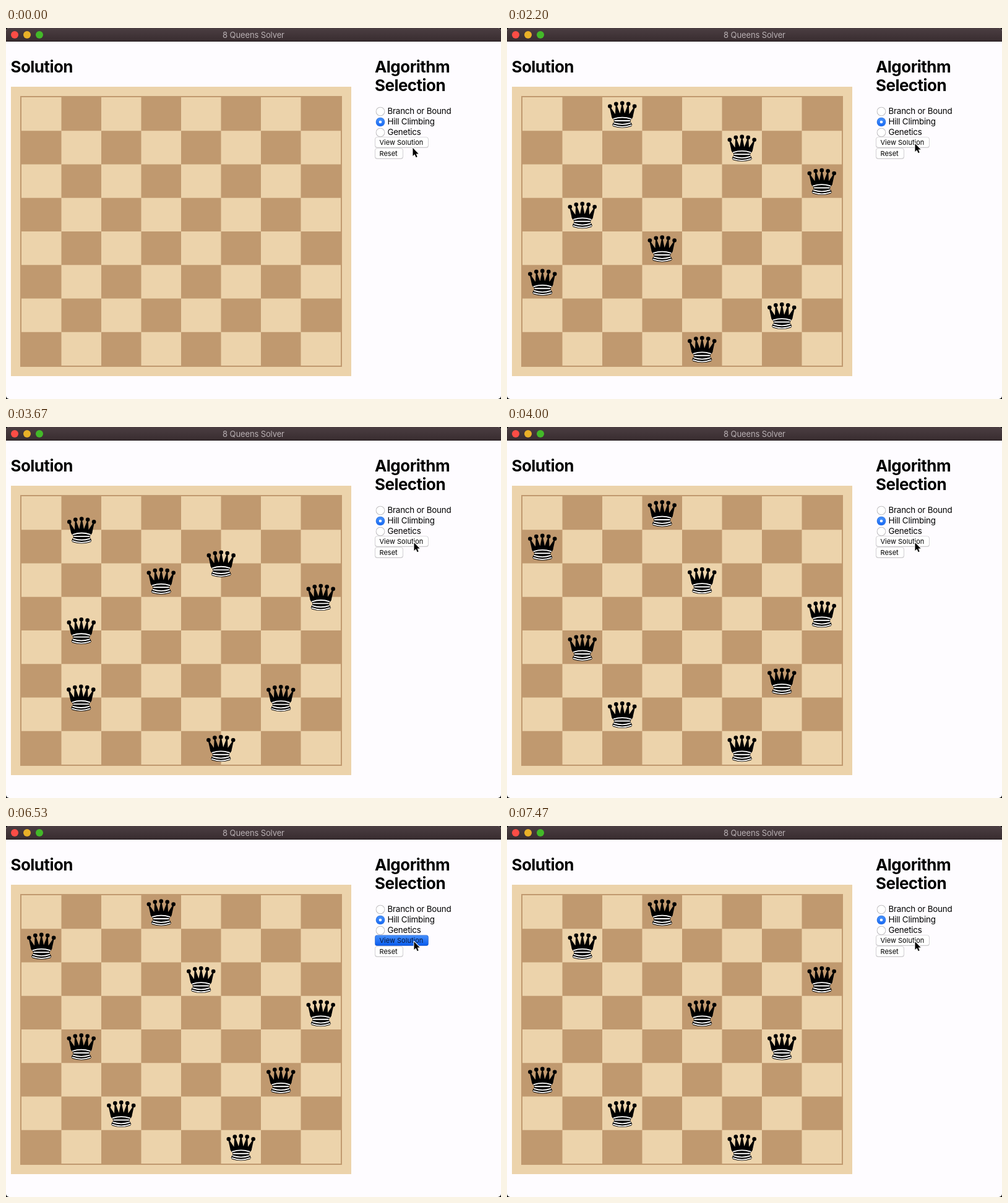
An HTML page with a canvas for the animation above (7.99 s loop, 800 by 600 pixels).

```html
<!DOCTYPE html>
<html lang="en">
<head>
<meta charset="utf-8">
<title>8 Queens Solver</title>
<style>
  html, body { margin: 0; width: 100%; height: 100%; overflow: hidden; background: #000; }
  canvas { display: block; width: 800px; height: 600px; }
</style>
</head>
<body>
<canvas id="stage" width="800" height="600"></canvas>
<script>
const stage = document.getElementById('stage');
const ctx = stage.getContext('2d');
const layer = new OffscreenCanvas(stage.width, stage.height);
const pieces = layer.getContext('2d');

const LOOP = 7990;
const TICK = 1000 / 15;
const CLICKS = [380, 3330, 6664];
const HOLD = 135;   // button stays down before each click
const DELAY = 38;   // from click to first movement
const ANIM = 600;

const LIGHT = '#ecd3ab';
const DARK = '#c0996f';
const BOARD = { x: 25, y: 112, w: 64.5, h: 54.25 };

// Column of the queen in each row, top to bottom
const SOLUTIONS = ['25713064', '30471625', '31746025'].map(
  s => [...s].map((col, row) => ({ col: +col, row })));
const STEPS = SOLUTIONS.slice(1).map((to, i) => pairUp(SOLUTIONS[i], to));

const clamp = v => Math.min(1, Math.max(0, v));
const swing = p => 0.5 - Math.cos(Math.PI * clamp(p)) / 2;
const mix = (a, b, p) => a + (b - a) * p;

// Queens already in place stay; from the bottom row up, each other square takes the nearest free queen
function pairUp(from, to) {
  const dist = (a, b) => Math.max(Math.abs(a.col - b.col), Math.abs(a.row - b.row));
  const free = [...from].sort((a, b) => a.col - b.col);
  const settled = to.filter(t => from.some(f => !dist(f, t)));
  const rest = to.filter(t => !settled.includes(t)).reverse();
  return [...settled, ...rest].map(t => {
    const nearest = free.reduce((best, f) => dist(f, t) < dist(best, t) ? f : best);
    free.splice(free.indexOf(nearest), 1);
    return [nearest, t];
  });
}

// Queen outline in a 45-unit square, symmetric about x = 22.5
const MID = 22.5;

function crownPath() {
  const path = new Path2D();
  path.moveTo(9, 26);
  for (let k = -2; k <= 2; k += 0.5) {
    const tip = Number.isInteger(k);
    path.lineTo(MID + k * (tip ? 8.1 : 5.8), tip ? 10 + 0.9 * k * k : 24.4 + 0.25 * k * k);
  }
  path.lineTo(36, 26);
  path.quadraticCurveTo(MID, 23.8, 9, 26);
  path.closePath();
  return path;
}

function basePath() {
  const half = new Path2D('M22.5 24.9Q16 24.9 9 26C9 28 10.5 28 11.5 30 12.5 31.5 12.5 31 12 33.5 10.5 34.5 10.5 36 10.5 36 9 37.5 11 38.5 11 38.5Q16.5 40.4 22.5 40.4Z');
  const path = new Path2D(half);
  path.addPath(half, new DOMMatrix().translate(2 * MID, 0).scale(-1, 1));
  return path;
}

const QUEEN = [crownPath(), basePath()];
const BANDS = new Path2D('M11 29A35 35 0 0 1 34 29M12.5 31.5H32.5M11.5 34.5A35 35 0 0 0 33.5 34.5M10.5 37.5A35 35 0 0 0 34.5 37.5');
const ARROW = new Path2D('M0 0V13L3 10.2 5.2 15.2 7.2 14.3 5.2 9.4H9.2Z');

function gradient(y0, y1, top, bottom) {
  const g = ctx.createLinearGradient(0, y0, 0, y1);
  g.addColorStop(0, top);
  g.addColorStop(1, bottom);
  return g;
}

function text(str, x, y, size, { weight = 400, color = '#000', spacing = 0, align = 'left' } = {}) {
  ctx.font = `${weight} ${size}px Inter, "Open Sans", sans-serif`;
  ctx.letterSpacing = spacing + 'px';
  ctx.textAlign = align;
  ctx.fillStyle = color;
  ctx.fillText(str, x, y);
}

function disc(c, x, y, r, fill) {
  c.beginPath();
  c.arc(x, y, r, 0, 2 * Math.PI);
  c.fillStyle = fill;
  c.fill();
}

function roundBox(x, y, w, h, r, fill) {
  ctx.beginPath();
  ctx.roundRect(x, y, w, h, r);
  ctx.fillStyle = fill;
  ctx.fill();
}

function drawWindow() {
  ctx.fillStyle = '#000';
  ctx.fillRect(0, 0, 800, 600);
  roundBox(0, 0, 800, 600, 5, '#fefcff');
  roundBox(0, 0, 800, 22, [5, 5, 0, 0], gradient(0, 22, '#4b3e42', '#382c2f'));
  ctx.fillStyle = '#1f1719';
  ctx.fillRect(0, 21, 800, 1);
  ['#fc4d46', '#e9b128', '#43b929'].forEach((color, i) => disc(ctx, 14 + 20 * i, 11, 6, color));
  text('8 Queens Solver', 400, 16, 13, { color: '#b9b1b4', spacing: -0.12, align: 'center' });

  const heading = { weight: 700, spacing: -0.55 };
  text('Solution', 7.5, 72, 26, heading);
  ['Algorithm', 'Selection'].forEach((word, i) => text(word, 596, 72 + 30 * i, 26, heading));
}

function drawBoard() {
  const { x, y, w, h } = BOARD;
  ctx.fillStyle = LIGHT;
  ctx.fillRect(8, 95, 550, 468);
  ctx.strokeStyle = DARK;
  ctx.lineWidth = 2;
  ctx.strokeRect(x - 1, y - 1, 8 * w + 2, 8 * h + 2);
  ctx.fillStyle = DARK;
  for (let row = 0; row < 8; row++) {
    for (let col = 1 - row % 2; col < 8; col += 2) {
      ctx.fillRect(x + col * w, y + row * h, w, h);
    }
  }
}

function drawRadio(label, y, checked) {
  disc(ctx, 605, y, 7.3, checked ? '#2a6fe0' : '#b4b2b5');
  disc(ctx, 605, y, 6.5, checked ? gradient(y - 7, y + 7, '#4a94fb', '#1668f5') : '#fff');
  if (checked) disc(ctx, 605, y, 2.3, '#fff');
  text(label, 616.5, y + 4, 13.4, { spacing: -0.22 });
}

function drawButton(label, y, w, pressed) {
  const x = 596.5, h = 16.5;
  roundBox(x - 0.2, y, w + 0.4, h + 0.7, 3.5, pressed ? '#0b4fc9' : '#bfbdc0');
  roundBox(x + 0.5, y + 0.6, w - 1, h - 0.9, 3,
    pressed ? gradient(y, y + h, '#4790f9', '#0a5df0') : '#fff');
  text(label, 603.5, y + 12.6, 11, { color: pressed ? '#06193f' : '#000' });
}

function drawQueen(col, row) {
  const { x, y, w, h } = BOARD;
  pieces.save();
  pieces.translate(x + col * w + (w - h) / 2, y + row * h);
  pieces.scale(h / 45, h / 45);
  pieces.lineWidth = 1.5;
  pieces.lineJoin = pieces.lineCap = 'round';
  pieces.strokeStyle = '#000';
  for (let k = -2; k <= 2; k++) disc(pieces, MID + 8.25 * k, 8 + k * k, 2.75, '#000');
  for (const part of QUEEN) {
    pieces.fill(part);
    pieces.stroke(part);
  }
  pieces.strokeStyle = '#fff';
  pieces.stroke(BANDS);
  pieces.restore();
}

function drawQueens(t) {
  const [fade, ...moves] = CLICKS.map(click => swing((t - click - DELAY) / ANIM));
  const step = moves[1] > 0 ? 1 : 0;
  pieces.clearRect(0, 0, layer.width, layer.height);
  for (const [from, to] of STEPS[step]) {
    drawQueen(mix(from.col, to.col, moves[step]), mix(from.row, to.row, moves[step]));
  }
  ctx.globalAlpha = fade;
  ctx.drawImage(layer, 0, 0);
  ctx.globalAlpha = 1;
}

function drawCursor(t) {
  const p = swing(t / 250);
  ctx.save();
  ctx.translate(mix(657.5, 659.5, p), mix(194, 187, p));
  ctx.lineJoin = 'round';
  ctx.lineWidth = 2;
  ctx.strokeStyle = '#fff';
  ctx.stroke(ARROW);
  ctx.fillStyle = '#000';
  ctx.fill(ARROW);
  ctx.restore();
}

function draw(now) {
  // The screen refreshes 15 times a second
  const t = Math.floor((now % LOOP + 4) / TICK) * TICK;
  const pressed = CLICKS.some(click => t >= click - HOLD && t < click);
  drawWindow();
  drawBoard();
  ['Branch or Bound', 'Hill Climbing', 'Genetics'].forEach(
    (label, i) => drawRadio(label, 135 + 17 * i, i === 1));
  drawButton('View Solution', 176.5, 86, pressed);
  drawButton('Reset', 194.5, 45, false);
  drawQueens(t);
  drawCursor(t);
}

const start = performance.now();
function loop() {
  draw(performance.now() - start);
  requestAnimationFrame(loop);
}
loop();
</script>
</body>
</html>
```
